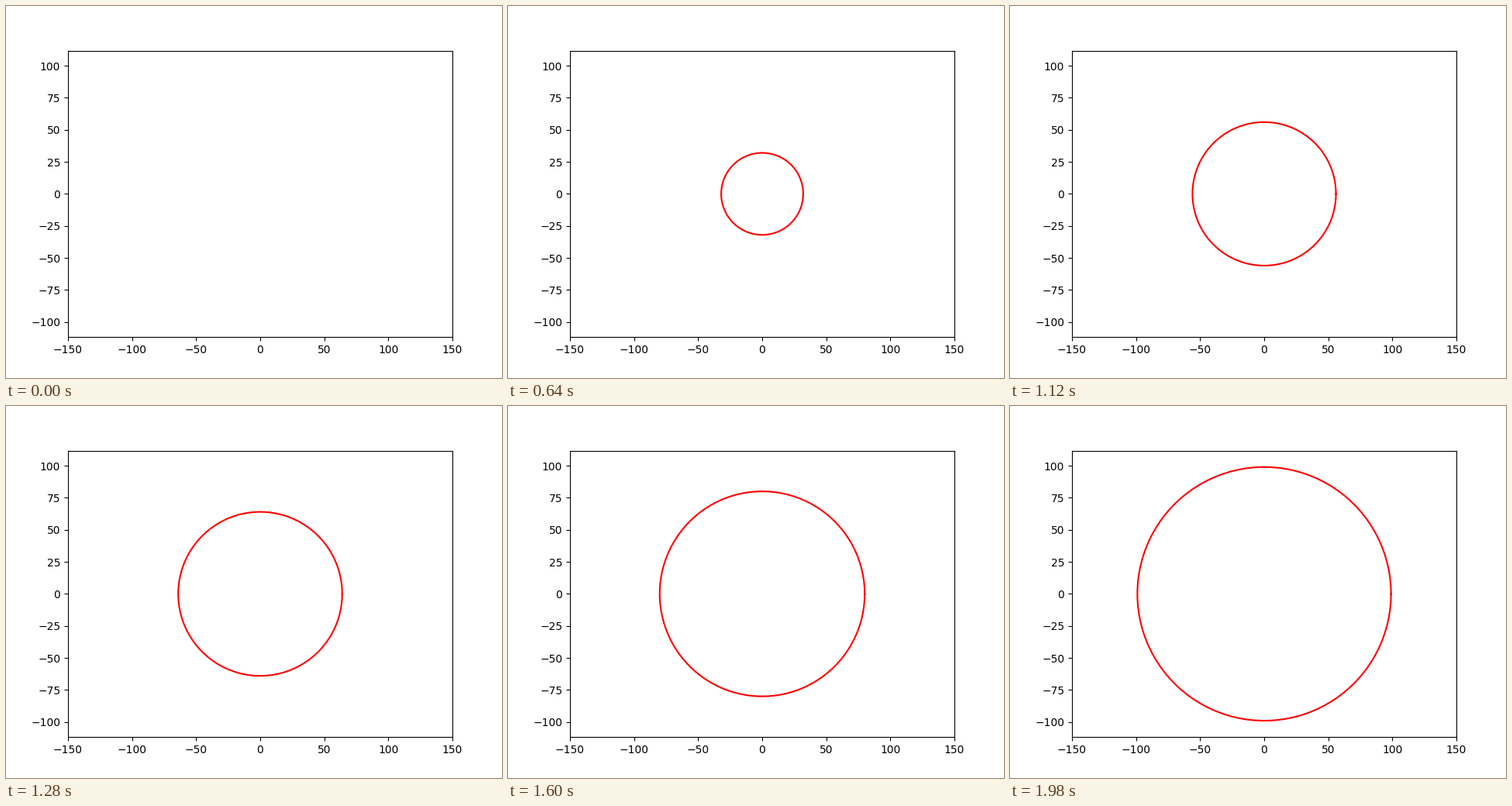
Recreate the animation shown at these times as a matplotlib script. Size 640 by 480 pixels, loop 2000 ms.

```python
import numpy as np
import matplotlib.pyplot as plt
from matplotlib.animation import FuncAnimation

FRAMES = 100
INTERVAL = 20  # ms

fig, ax = plt.subplots(figsize=(6.4, 4.8), dpi=100)
half_width = 150
half_height = half_width * (0.77 * 480) / (0.775 * 640)  # equal scale on both axes
ax.set_xlim(-half_width, half_width)
ax.set_ylim(-half_height, half_height)

theta = np.linspace(0, 2 * np.pi, 100)
circle, = ax.plot([], [], color="red", lw=1.5)


def update(radius):
    circle.set_data(radius * np.cos(theta), radius * np.sin(theta))
    circle.set_visible(radius > 0)
    return circle,


anim = FuncAnimation(fig, update, frames=FRAMES, interval=INTERVAL,
                     repeat=True, repeat_delay=0)
plt.show()
```
